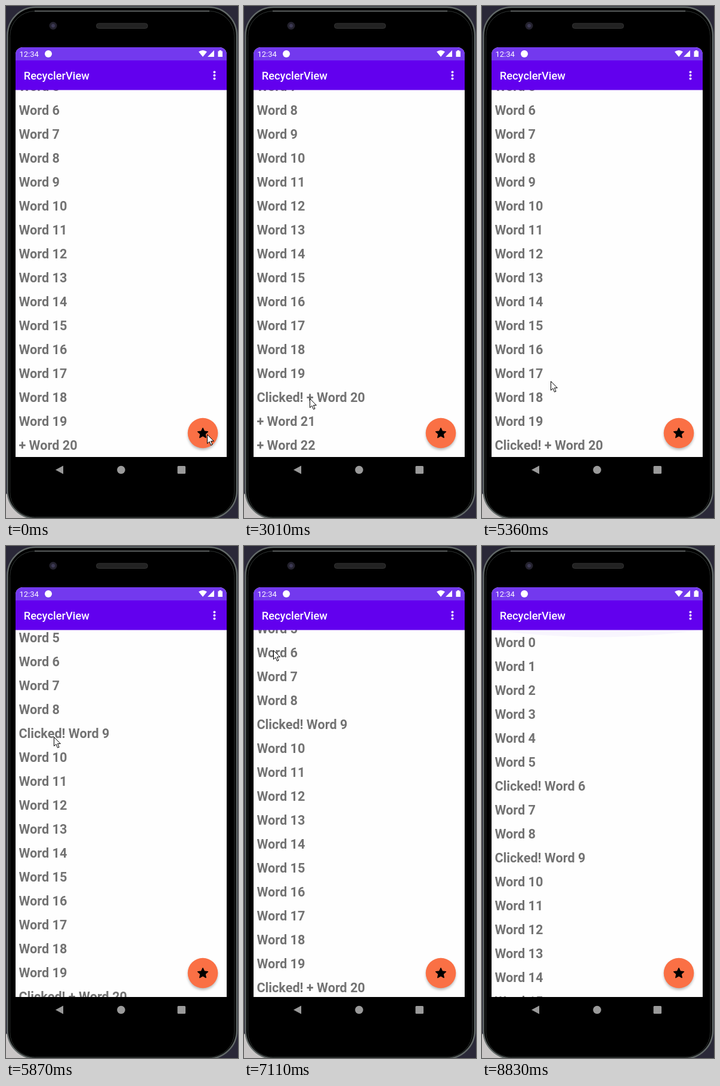
Animation, 389 px wide and 856 px high, one loop 9.24 s. Source, as an HTML page:

```html
<!DOCTYPE html>
<html lang="en">
<head>
<meta charset="utf-8">
<title>Word list</title>
<style>
  html, body { margin: 0; width: 100%; height: 100%; overflow: hidden; background: #2a2838; }
  svg { display: block; width: 389px; height: 856px; font-family: Roboto, sans-serif; }
  #list { font-size: 21.65px; font-weight: 700; fill: #737373; }
</style>
</head>
<body>
<svg viewBox="0 0 389 856">
  <defs>
    <clipPath id="screen"><path d="M16 754V81a12 12 0 0 1 12-12H358a12 12 0 0 1 12 12V754Z"/></clipPath>
    <clipPath id="view"><rect x="16" y="140" width="354" height="614"/></clipPath>
    <filter id="blur" x="-30%" y="-30%" width="160%" height="160%"><feGaussianBlur stdDeviation="2.2"/></filter>
  </defs>

  <!-- phone -->
  <path d="M0 815L50 856H0Z" fill="#c9c6c6"/>
  <rect x="2.5" y="2" width="384.500" height="855" rx="47" stroke="#626968" stroke-width="2.500"/>
  <rect x="6.500" y="8.500" width="376.500" height="846" rx="42" stroke="#303534"/>
  <path d="M48 8.500H341" stroke="#787e7d" stroke-width="1.500"/>
  <circle cx="79" cy="33" r="6.500" fill="#24222e"/>
  <circle cx="79" cy="33" r="3" fill="#3d3a55"/>
  <rect x="151.500" y="29" width="86" height="8.500" rx="4" fill="#222" stroke="#333"/>

  <!-- app -->
  <g clip-path="url(#screen)">
    <rect x="16" y="69" width="354" height="685" fill="#fefefe"/>
    <g clip-path="url(#view)">
      <g id="list"></g>
      <path id="glow" fill="#6200ee" fill-opacity=".035"/>
    </g>
    <rect x="16" y="69" width="354" height="22" fill="#7339ee"/>
    <rect x="16" y="91" width="354" height="49.500" fill="#6200ee"/>
  </g>
  <g fill="#fff">
    <text x="22.500" y="84.500" font-size="13">12:34</text>
    <circle cx="71" cy="80" r="6"/>
    <path d="M323 76.500Q330 71.500 337 76.500L330 85Z"/>
    <path d="M349 74V85H338Z"/>
    <path d="M355.500 75.500H357.500V74H361V75.500H363V85H355.500Z"/>
    <text x="29.800" y="123" font-size="18.300" font-weight="500">RecyclerView</text>
    <path d="M349.500 110.500v0m0 5.500v0m0 5.500v0" stroke="#fff" stroke-width="4" stroke-linecap="round"/>
  </g>

  <!-- round button -->
  <circle cx="330" cy="717" r="25" fill-opacity=".28" filter="url(#blur)"/>
  <circle cx="330" cy="714" r="25.300" fill="#fa7045"/>
  <circle id="ripple" cx="330" cy="714" r="25.300" fill="#fff"/>
  <path id="star" stroke="#000" stroke-width="1.500" stroke-linejoin="round"/>

  <g fill="#9a9a9a">
    <path d="M83 775.500L96 768.500V782.500Z"/>
    <circle cx="193" cy="775.500" r="6.800"/>
    <rect x="287.500" y="769" width="13.500" height="13" rx="1.500"/>
  </g>
  <path id="cursor" d="M-.5 .5V15.500L3 12.300 5.500 18.300 8 17.300 5.500 11.500H10.300Z" fill="#fff" stroke="#000"/>
</svg>
<script>
const LOOP = 9240, TICK = 136.4, ROW = 40;
const $ = id => document.getElementById(id);

// When words are added, and when each one is clicked
const added = { 21: 960, 22: 1800 };
const clicked = { 20: 3010, 21: 4120, 22: 4550, 9: 5870, 6: 7260 };

// Pointer moves; a drag takes the list along
const start = { x: 338, y: 716 };
const moves = [
  { from: 2000, to: 2720, x: 111, y: 656 },
  { from: 3400, to: 3810, x: 81, y: 690 },
  { from: 4130, to: 4220, x: 92, y: 735 },
  { from: 4550, to: 4720, x: 117, y: 547 },
  { from: 4720, to: 5560, x: 116, y: 646, drag: true },
  { from: 5570, to: 5800, x: 81, y: 319 },
  { from: 6100, to: 6700, x: 78, y: 304, drag: true },
  { from: 6700, to: 7080, x: 50, y: 174 },
  { from: 7260, to: 7900, x: 153, y: 378 },
  { from: 7900, to: 8802, x: 157, y: 807, drag: true }
];

const clamp = (v, lo, hi) => Math.min(hi, Math.max(lo, v));
const ease = u => (1 - Math.cos(Math.PI * clamp(u, 0, 1))) / 2;

// Pointer place and the distance dragged so far
function pointerAt(t) {
  let { x, y } = start, dragged = 0;
  for (const m of moves) {
    const u = ease((t - m.from) / (m.to - m.from));
    const dy = (m.y - y) * u;
    x += (m.x - x) * u;
    y += dy;
    if (m.drag) dragged += dy;
    if (u < 1) break;
  }
  return { x, y, dragged };
}

const rows = Array.from({ length: 23 }, (_, i) => {
  const row = document.createElementNS("http://www.w3.org/2000/svg", "text");
  row.setAttribute("x", 21.4);
  row.setAttribute("y", 169.4 + ROW * i);
  return $("list").appendChild(row);
});

const star = Array.from({ length: 10 }, (_, i) => {
  const r = i % 2 ? 4.2 : 8.8, a = (i / 5 - 0.5) * Math.PI;
  return `${330 + r * Math.cos(a)} ${714.5 + r * Math.sin(a)}`;
});
$("star").setAttribute("d", `M${star.join("L")}Z`);

function draw(now) {
  const t = now % LOOP;
  const { x, y, dragged } = pointerAt(Math.floor(t / TICK) * TICK);

  rows.forEach((row, i) => {
    const label = (t >= clicked[i] ? "Clicked! " : "") + (i > 19 ? "+ " : "") + "Word " + i;
    if (row.textContent !== label) row.textContent = label;
    row.style.display = t < added[i] ? "none" : "";
  });

  const adds = Object.values(added).filter(a => t >= a);
  const offset = Math.round(227 + ROW * adds.length - dragged);
  $("list").setAttribute("transform", `translate(0 ${-Math.max(0, offset)})`);
  $("glow").setAttribute("d", `M16 140Q193 ${140 + clamp(-offset / 8, 0, 25)} 370 140Z`);
  $("ripple").setAttribute("fill-opacity", adds.some(a => t < a + 250) ? 0.18 : 0);

  $("cursor").setAttribute("transform", `translate(${Math.round(x)} ${Math.round(y)})`);
  $("cursor").style.display = t >= 8820 ? "none" : "";
  requestAnimationFrame(draw);
}
requestAnimationFrame(draw);
</script>
</body>
</html>
```
